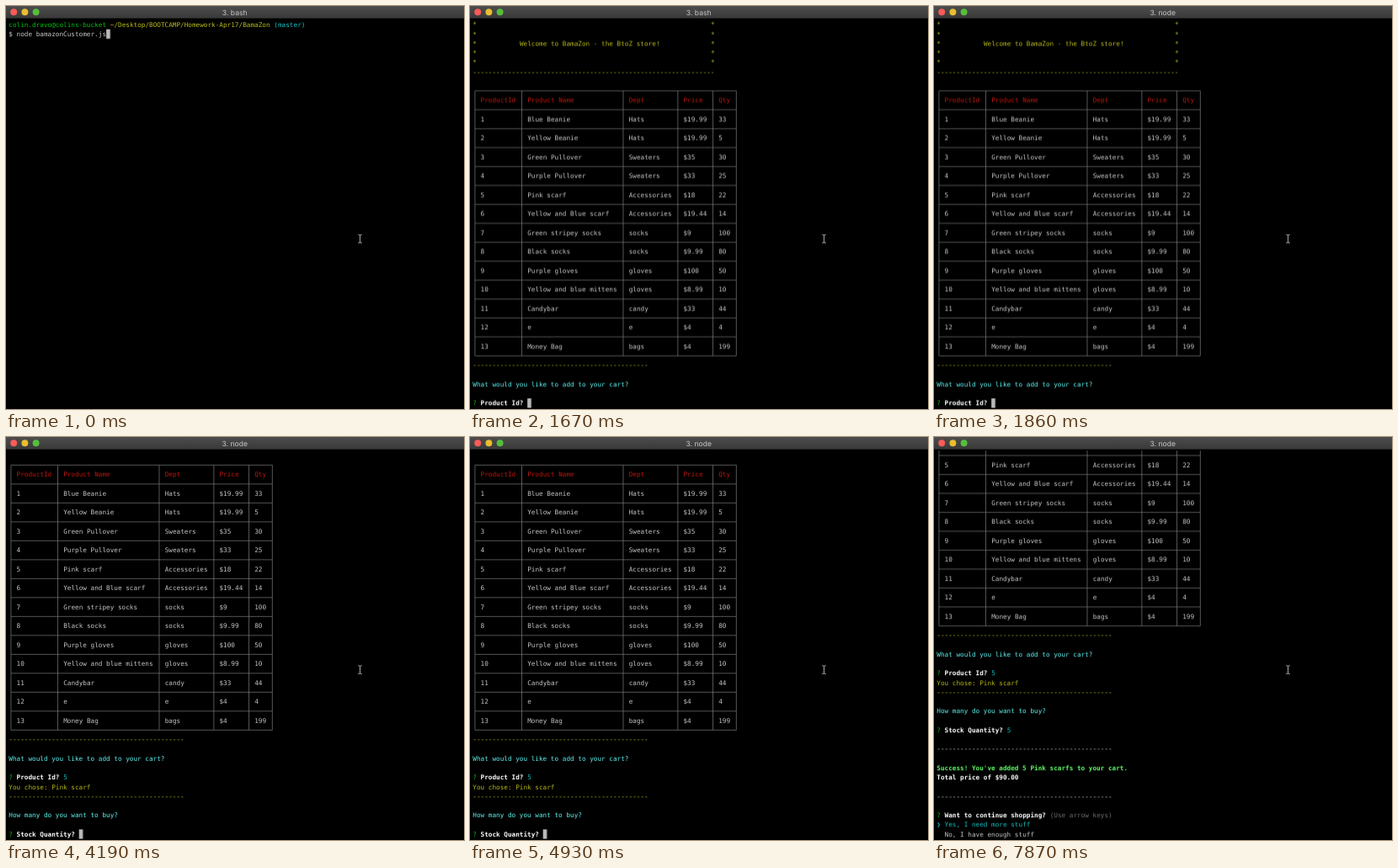
An HTML page that plays this animation: 544x479 px, repeating every 8000 ms.

```html
<!DOCTYPE html>
<html lang="en">
<head>
<meta charset="utf-8">
<title>Terminal session</title>
<style>
  html, body { margin: 0; width: 100%; height: 100%; overflow: hidden; background: #000; }
  svg { display: block; }
  text { white-space: pre; text-rendering: geometricPrecision; }
  #screen { font: 7.696px "DejaVu Sans Mono", monospace; fill: #c7c7c7; }
  .bar { font: 8.6px Inter, sans-serif; fill: #c6c6c6; text-anchor: middle; }
  .rule { font: 7.722px "Noto Sans Mono", monospace; }
  .green { fill: #00bd0c; }
  .yellow { fill: #b9bb1c; }
  .cyan { fill: #12bfc0; }
  .red { fill: #c0170d; }
  .dim { fill: #6e6e6e; }
  .aqua { fill: #60f5f2; }
  .bold { fill: #fff; font-weight: bold; }
  .lime { fill: #5ffa68; font-weight: bold; }
</style>
</head>
<body>
<svg id="stage" width="544" height="479" viewBox="0 0 544 479">
  <defs>
    <linearGradient id="metal" x2="0" y2="1">
      <stop stop-color="#4d4d4d"/>
      <stop offset="1" stop-color="#393939"/>
    </linearGradient>
  </defs>
  <rect width="544" height="479"/>
  <rect width="544" height="14.6" fill="url(#metal)"/>
  <circle cx="9.2" cy="7.3" r="3.95" fill="#fc5b57"/>
  <circle cx="22.4" cy="7.3" r="3.95" fill="#e9bd30"/>
  <circle cx="35.6" cy="7.3" r="3.95" fill="#53c039"/>
  <text class="bar" id="bash" x="271.7" y="10.5">3. bash</text>
  <text class="bar" id="node" x="271.7" y="10.5">3. node</text>
  <svg id="screen" y="16.4" width="544" height="461.25">
    <g id="shell"></g>
    <g id="store"></g>
    <rect id="cursor" width="4.63" height="11.25" fill="#bababa"/>
  </svg>
  <path d="M418.3 271.6q2.2 0 2.2 1.6v7q0 1.6-2.2 1.6M422.7 271.6q-2.2 0-2.2 1.6M420.5 280.2q0 1.6 2.2 1.6"
        fill="none" stroke="#d4d4d4" stroke-width=".8"/>
</svg>
<script>
const LOOP = 8000, CELL = 4.6333, ROW = 11.25, LEFT = 3.3;
const RUN = 1360, OPEN = 1670, RENAME = 1860, TYPE_ID = 3640, CHOSEN = 4190, TYPE_QTY = 6040, DONE = 7870;
const $ = id => document.getElementById(id);
const colX = col => LEFT + col * CELL;

function add(parent, tag, attrs, content = "") {
  const el = document.createElementNS("http://www.w3.org/2000/svg", tag);
  for (const key in attrs) el.setAttribute(key, attrs[key]);
  el.textContent = content;
  return parent.appendChild(el);
}

const put = (parent, row, col, content, color = "") =>
  add(parent, "text", { x: colX(col), y: row * ROW + 8.4, class: color }, content);

// Holds each value until the next step: [time, value]
function play(el, prop, steps) {
  const frames = steps.map(([t, v]) => ({ offset: t / LOOP, [prop]: v, easing: "steps(1, end)" }));
  frames.push({ offset: 1, [prop]: steps.at(-1)[1] });
  el.animate(frames, { duration: LOOP, iterations: Infinity });
}

function show(el, from, to = LOOP) {
  const steps = [[0, from ? 0 : 1]];
  if (from) steps.push([from, 1]);
  if (to < LOOP) steps.push([to, 0]);
  play(el, "opacity", steps);
}

const shell = $("shell"), store = $("store");
const rule = (row, color = "", length = 45) =>
  put(store, row, 0, "-".repeat(length), `rule ${color}`);

put(shell, 0, 0, "colin.dravo@colins-bucket", "green");
put(shell, 0, 26, "~/Desktop/BOOTCAMP/Homework-Apr17/BamaZon", "yellow");
put(shell, 0, 68, "(master)", "cyan");
put(shell, 1, 0, "$ node bamazonCustomer.js");

// Welcome banner
for (let row = 0; row < 5; row++)
  for (const col of [0, 61]) put(store, row, col, "*", "yellow");
put(store, 2, 12, "Welcome to BamaZon - the BtoZ store!", "yellow");
rule(5, "yellow", 62);

// Product table
const products = `ProductId|Product Name|Dept|Price|Qty
1|Blue Beanie|Hats|$19.99|33
2|Yellow Beanie|Hats|$19.99|5
3|Green Pullover|Sweaters|$35|30
4|Purple Pullover|Sweaters|$33|25
5|Pink scarf|Accessories|$18|22
6|Yellow and Blue scarf|Accessories|$19.44|14
7|Green stripey socks|socks|$9|100
8|Black socks|socks|$9.99|80
9|Purple gloves|gloves|$100|50
10|Yellow and blue mittens|gloves|$8.99|10
11|Candybar|candy|$33|44
12|e|e|$4|4
13|Money Bag|bags|$4|199`.split("\n");
const borders = [0, 12, 38, 52, 61, 67], tableTop = 7;
const lineX = col => colX(col + 0.5) + 0.3;
const lineY = i => (tableTop + 2 * i + 0.5) * ROW;
let grid = "";
for (const col of borders) grid += `M${lineX(col)} ${lineY(0)}V${lineY(products.length)}`;
for (let i = 0; i <= products.length; i++) grid += `M${lineX(0)} ${lineY(i)}H${lineX(67)}`;
add(store, "path", { d: grid, stroke: "#868686", "stroke-width": 0.65, fill: "none" });
products.forEach((line, i) => line.split("|").forEach((cell, c) =>
  put(store, tableTop + 1 + 2 * i, borders[c] + 2, cell, i ? "" : "red")));

// Prompts; a typed answer turns cyan once it is accepted
function ask(row, question) {
  put(store, row, 0, "?", "green");
  put(store, row, 2, question, "bold");
}
function answer(row, col, value, typed, accepted) {
  show(put(store, row, col, value), typed, accepted);
  show(put(store, row, col, value, "cyan"), accepted);
}

rule(36, "yellow");
put(store, 38, 0, "What would you like to add to your cart?", "aqua");
ask(40, "Product Id?");
answer(40, 14, "5", TYPE_ID, CHOSEN);
put(store, 41, 0, "You chose: Pink scarf", "yellow");
rule(42, "yellow");
put(store, 44, 0, "How many do you want to buy?", "aqua");
ask(46, "Stock Quantity?");
answer(46, 18, "5", TYPE_QTY, DONE);
rule(48);
put(store, 50, 0, "Success! You've added 5 Pink scarfs to your cart.", "lime");
put(store, 51, 0, "Total price of $90.00", "bold");
rule(53);
ask(55, "Want to continue shopping?");
put(store, 55, 29, "(Use arrow keys)", "dim");
put(store, 56, 0, "❯", "cyan");
put(store, 56, 2, "Yes, I need more stuff", "cyan");
put(store, 57, 2, "No, I have enough stuff");

// Timeline
const scroll = rows => `translate(0px, ${-rows * ROW}px)`;
const at = (row, col) => `translate(${colX(col)}px, ${row * ROW}px)`;
show($("bash"), 0, RENAME);
show($("node"), RENAME);
show(shell, 0, OPEN);
show(store, OPEN);
play(store, "transform", [[0, scroll(0)], [CHOSEN, scroll(6)], [DONE, scroll(17)]]);
show($("cursor"), 0, DONE);
play($("cursor"), "transform", [
  [0, at(1, 25)], [RUN, at(2, 0)], [OPEN, at(40, 14)],
  [TYPE_ID, at(40, 15)], [CHOSEN, at(40, 18)], [TYPE_QTY, at(40, 19)]
]);
</script>
</body>
</html>
```
